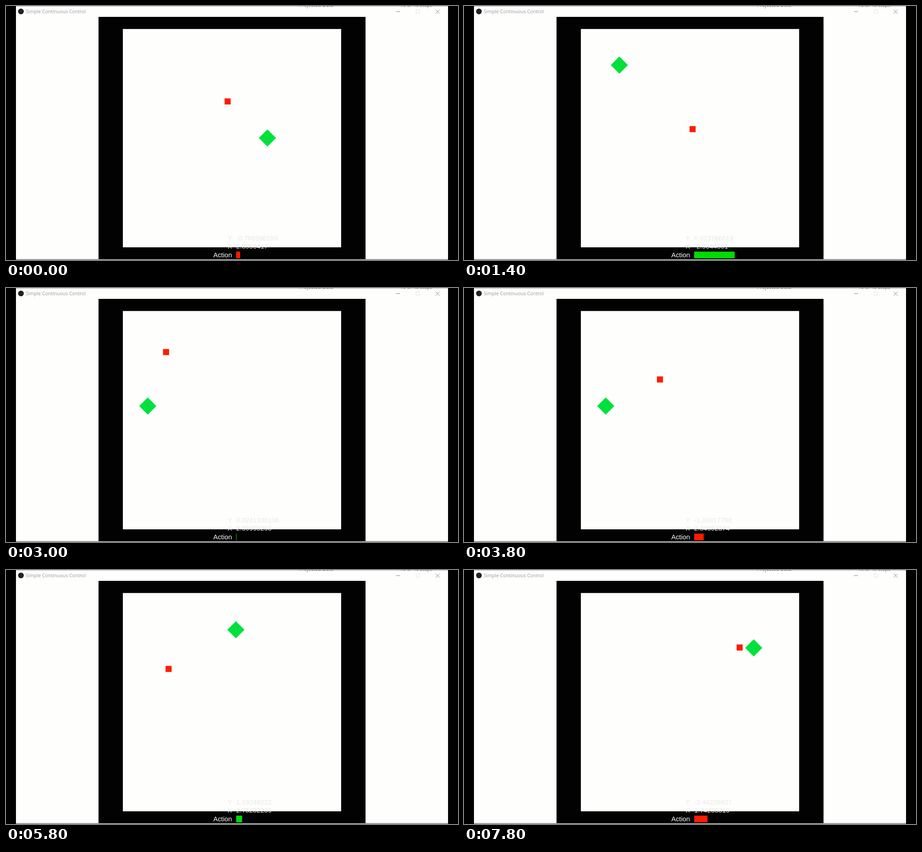
Animation, 998 px wide and 561 px high, one loop 8000 ms. Source, as an HTML page:

```html
<!DOCTYPE html>
<html lang="en">
<head>
<meta charset="utf-8">
<title>Simple Continuous Control</title>
<style>
  html, body { margin: 0; width: 100%; height: 100%; overflow: hidden; background: #000; }
  svg { display: block; width: 998px; height: 561px; }
  text { font: 14.8px "Liberation Sans", Arial, sans-serif; fill: #e8e8e8; }
  .title { font: 10.6px "Open Sans", "Noto Sans", sans-serif; fill: #989898; }
  .behind { font: 11px "Open Sans", sans-serif; fill: #777; }
  .action { fill: #fff; }
  .buttons { fill: none; stroke: #858585; }
</style>
</head>
<body>
<svg viewBox="0 0 998 561">
  <rect width="998" height="561" fill="#000"/>
  <rect x="22" width="954" height="559" fill="#fefefd"/>
  <path d="M22 .4H976" stroke="#8a8a8a" stroke-width=".8"/>
  <text class="behind" x="647" y="1.5">Projected Data</text>
  <text class="behind" x="870" y="1.5">10 of 40 steps</text>

  <circle cx="33" cy="12" r="6.3" fill="#222"/>
  <text class="title" x="43.5" y="16">Simple Continuous Control</text>
  <g class="buttons">
    <path d="M861 12.5H870M948.5 8L957.5 17M957.5 8L948.5 17"/>
    <rect x="905.5" y="8.5" width="7.5" height="7.5" stroke="#e2e2e2"/>
  </g>

  <rect x="204.3" y="24" width="589.5" height="535" fill="#020203"/>
  <rect x="258" y="50.8" width="482" height="482.2" fill="#fefefd"/>
  <path d="M22 559.5H976" stroke="#777"/>
  <path d="M22 560.5H976" stroke="#bbb"/>

  <rect id="agent" x="-6.7" y="-6.7" width="13.4" height="13.4" fill="#ff1c00"/>
  <path id="goal" d="M0-18.95L18.95 0 0 18.95-18.95 0Z" fill="#00e13c"/>

  <text x="489.3" y="517.5">Y</text><text id="valueY" x="508.3" y="517.5"></text>
  <text x="489.3" y="536.3">X</text><text id="valueX" x="508.3" y="536.3"></text>
  <text class="action" x="457.8" y="555">Action</text>
  <rect id="bar" x="508.2" y="542.5" height="14.7"/>
</svg>
<script>
  const STEP = 200, STEPS = 40, SPEED = 3;
  const TURN = 100; // length of the curve tangents in pixels

  const key = (step, x, y, vx, vy) => ({ step, x, y, vx, vy });

  // Each leg keeps one goal until the agent's last key point in it
  const legs = [
    { goal: [577.2, 291.5], keys: [
      key(0, 489.3, 210.8, 2.8950417, -0.7865962),
      key(4, 562.6, 277, 2.48948288, -1.67405963)] },
    { goal: [343, 130.5], keys: [
      key(11, 360.6, 236.5, -2.87115765, 0.869743943),
      key(14, 347, 151, 0, 3)] },
    { goal: [313, 260.7], keys: [
      key(19, 432.7, 202, 2.34652376, -1.869178),
      key(24, 363.6, 184.2, -2.230497, 2.00621128),
      key(26, 322, 237, -1.6, -2.5)] },
    { goal: [507.6, 132], keys: [
      key(29, 359, 218.5, 2.75289857, 1.192495),
      key(34, 484, 146, 2.9, 0.6)] },
    { goal: [639.7, 172], keys: [
      key(39, 608.6, 171.2, 1.74205327, -2.44238639)] }
  ];
  const keys = legs.flatMap(leg => leg.keys);

  // Cubic Hermite value and slope
  function hermite(p, q, m, n, u) {
    const a = 2 * (p - q) + m + n, b = 3 * (q - p) - 2 * m - n;
    return [((a * u + b) * u + m) * u + p, (3 * a * u + 2 * b) * u + m];
  }

  function agentAt(step) {
    const i = Math.max(1, keys.findIndex(k => k.step >= step));
    const from = keys[i - 1], to = keys[i], k = TURN / SPEED;
    const u = (step - from.step) / (to.step - from.step);
    const [x, dx] = hermite(from.x, to.x, from.vx * k, to.vx * k, u);
    const [y, dy] = hermite(from.y, to.y, -from.vy * k, -to.vy * k, u);
    return { x, y, heading: Math.atan2(-dy, dx) };
  }

  const el = id => document.getElementById(id);
  const place = (id, x, y) => el(id).setAttribute("transform", `translate(${x} ${y})`);
  const show = (id, value) => { el(id).textContent = +(SPEED * value).toPrecision(9); };

  function draw(step) {
    const { x, y, heading } = agentAt(step);
    place("agent", x, y);
    place("goal", ...legs.find(leg => step <= leg.keys.at(-1).step).goal);
    show("valueX", Math.cos(heading));
    show("valueY", Math.sin(heading));
    el("bar").setAttribute("width", 0.8 + 94.9 * Math.abs(heading) / Math.PI);
    el("bar").setAttribute("fill", heading < 0 ? "#ff1c00" : "#00dc00");
  }

  const start = performance.now();
  function tick() {
    const elapsed = Math.max(0, performance.now() - start);
    draw(Math.floor(elapsed / STEP) % STEPS);
    requestAnimationFrame(tick);
  }
  tick();
</script>
</body>
</html>
```
